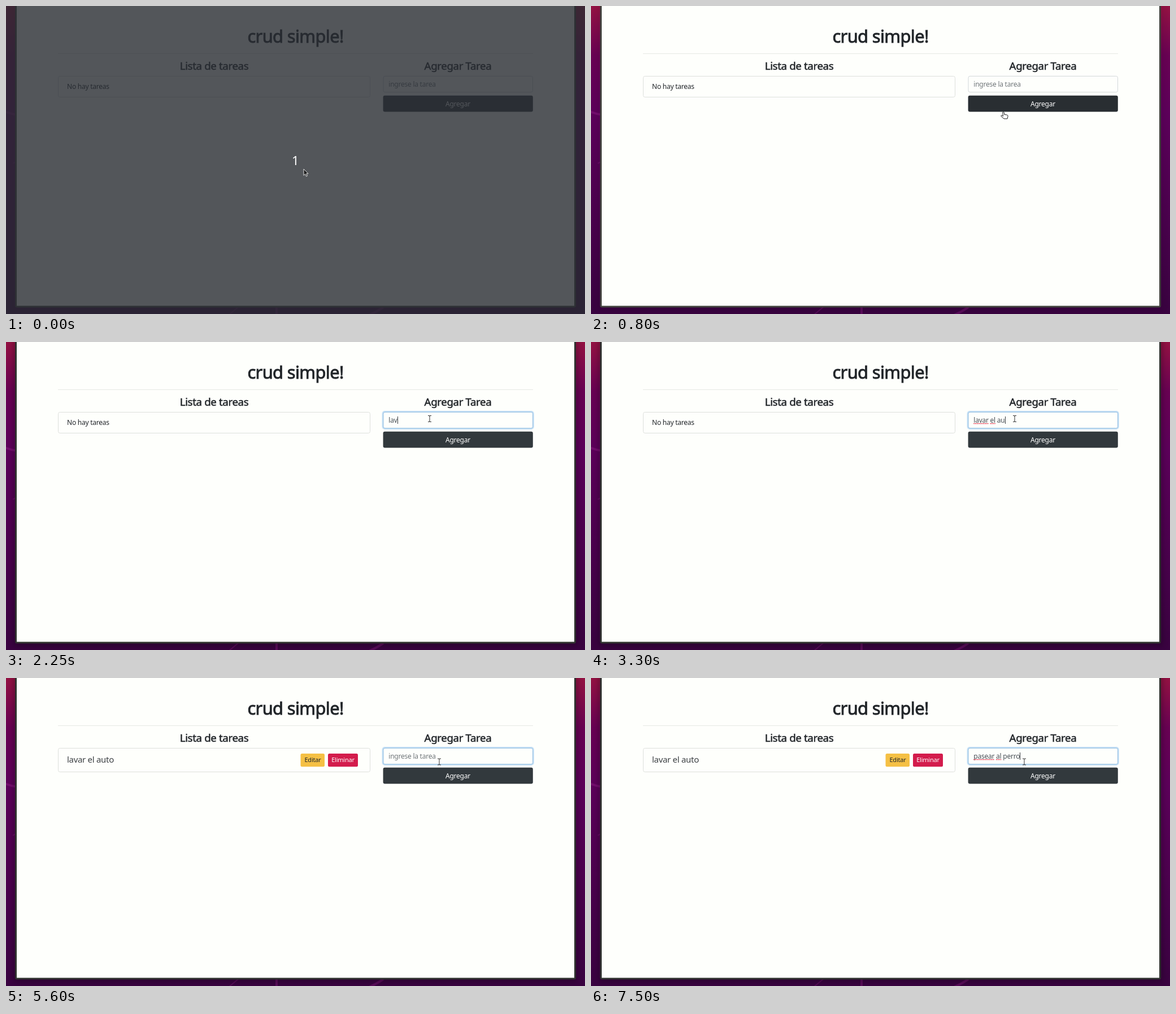
These frames come from a looping animation (1025x546 px, 8 s). An HTML page:

```html
<!DOCTYPE html>
<html lang="es">
<head>
<meta charset="utf-8">
<title>crud simple</title>
<style>
html, body { margin: 0; width: 100%; height: 100%; overflow: hidden; background: #3b0340; }
svg { display: block; width: 1025px; height: 546px; }
text {
  font: 400 12px "Noto Sans", "Open Sans", sans-serif;
  letter-spacing: -0.02em; white-space: pre; fill: #212529;
}
.mid { text-anchor: middle; }
.title { font-size: 30.8px; stroke: #212529; stroke-width: .9px; }
.head { font-size: 18.7px; stroke: #212529; stroke-width: .5px; }
.task { font-size: 15px; font-weight: 300; fill: #3c4043; }
.small { font-size: 11px; }
.light { fill: #fff; }
.box { fill: #fefffc; stroke: #dddfdc; }
</style>
</head>
<body>
<svg viewBox="0 0 1025 546">
  <defs>
    <linearGradient id="sky" x2="0" y2="1">
      <stop offset="0" stop-color="#941243"/>
      <stop offset=".16" stop-color="#680253"/>
      <stop offset=".35" stop-color="#5c005a"/>
      <stop offset="1" stop-color="#390340"/>
    </linearGradient>
    <filter id="blur" x="-5%" y="-5%" width="110%" height="110%"><feGaussianBlur stdDeviation="6"/></filter>
  </defs>

  <rect width="1025" height="546" fill="url(#sky)"/>
  <g fill="none" stroke="#8a1a80" stroke-opacity=".5" stroke-width="4">
    <path d="M-2 187Q8 191 20 193"/>
    <path d="M479 530V548M640 549Q655 543 668 534" stroke-opacity=".4"/>
    <path d="M394 548L412 533M12 279L18 276" stroke-width="2" stroke-opacity=".35"/>
  </g>
  <rect id="shadow" x="14" y="-30" width="997" height="568" filter="url(#blur)"/>
  <path id="frame" d="M16 0H1009V531Q1009 534.500 1005.500 534.500H19.500Q16 534.500 16 531Z"/>
  <rect x="19" width="987" height="531.500" fill="#fefffc"/>

  <text class="title mid" x="512.500" y="64.500">crud simple!</text>
  <path d="M92 84.500H933" stroke="#e6e8e4"/>
  <text class="head mid" x="368.500" y="113">Lista de tareas</text>
  <text class="head mid" x="800" y="113">Agregar Tarea</text>

  <g id="empty">
    <rect class="box" x="92.500" y="124.500" width="552" height="37" rx="3"/>
    <text x="108" y="147">No hay tareas</text>
  </g>
  <g id="item">
    <rect class="box" x="92.500" y="124.500" width="552" height="42" rx="3"/>
    <text class="task" x="108" y="150">lavar el auto</text>
    <rect x="521.500" y="134" width="42.500" height="23.300" rx="2.500" fill="#f5c044"/>
    <text class="small mid" x="543" y="149.300">Editar</text>
    <rect x="570" y="134" width="53" height="23.300" rx="2.500" fill="#d31c4c"/>
    <text class="small mid light" x="596.500" y="149.300">Eliminar</text>
  </g>

  <rect id="ring" x="665.600" y="122" width="269.200" height="33" rx="5" fill="#c4dff5"/>
  <rect id="field" x="668" y="124.400" width="264.500" height="28.400" rx="3" fill="#fefffc" stroke-width=".9"/>
  <text id="typed" x="677.300" y="143"></text>
  <path id="marks" fill="none" stroke="#e0203a" stroke-width="1.300" stroke-dasharray="2 .8"/>
  <path id="caret" stroke="#33383c"/>
  <rect id="button" x="667.600" y="158.700" width="265.200" height="28.800" rx="3"/>
  <text class="mid light" x="800" y="178">Agregar</text>

  <g id="count">
    <rect width="1025" height="546" fill="#282c33" fill-opacity=".8"/>
    <text class="mid light" x="512" y="281.500" style="font-size:22px">1</text>
  </g>

  <g id="pointer">
    <path id="arrow" d="M0 0V11.300L2.600 8.900L4.500 13L6.400 12.100L4.600 8.200H8Z" fill="#1c1c1c" stroke="#f4f4f4" stroke-width=".9"/>
    <path id="hand" d="M-1.500 1Q0 -.5 1 1.200L1.500 5L6 5.600Q8 6 7.800 8L6.800 12.500H.8L-4.300 8Q-4.800 6.200-2.800 6.500L-.8 8Z" fill="#fff" stroke="#222"/>
    <path id="beam" d="M-3 -5.500H-1Q0-5.500 0-4.500Q0-5.500 1-5.500H3M0-5V5M-3 5.500H-1Q0 5.500 0 4.500Q0 5.500 1 5.500H3" fill="none" stroke="#333"/>
  </g>
</svg>
<script>
const LOOP = 8000, STEP = 50, SAVED = 3800;
const el = {};
document.querySelectorAll('svg [id]').forEach(n => el[n.id] = n);

// Each glide slows down towards its end; px and py set how sharply per axis
const home = { x: 527, y: 289 };
const glides = [
  { from: 550, to: 1100, x: 750, y: 136, px: 4, py: 1.8 },
  { from: 4400, to: 4750, x: 772, y: 171, px: 2, py: 2 },
  { from: 4950, to: 5250, x: 767, y: 148.5, px: 2, py: 2 }
];

// Letters arrive evenly between first and last
const phrases = [
  { text: 'lavar el auto', first: 1950, last: 3500, end: SAVED },
  { text: 'pasear al perro', first: 5650, last: 7500, end: LOOP }
];

const ramp = (t, start, span) => Math.max(0, Math.min(1, (t - start) / span));
const pulse = (t, on, off) => ramp(t, on, 100) - ramp(t, off, 100);
const mix = (a, b, k) => `rgb(${a.map((v, i) => Math.round(v + (b[i] - v) * k))})`;
const show = (node, on) => node.setAttribute('display', on ? 'inline' : 'none');

function pointerAt(t) {
  let { x, y } = home;
  for (const g of glides) {
    const rest = 1 - ramp(t, g.from, g.to - g.from);
    x = g.x + (x - g.x) * rest ** g.px;
    y = g.y + (y - g.y) * rest ** g.py;
  }
  return { x, y };
}

function textAt(t) {
  const p = phrases.find(p => t >= p.first && t < p.end);
  if (!p) return '';
  const k = ramp(t, p.first, p.last - p.first);
  return p.text.slice(0, 1 + Math.floor(k * (p.text.length - 1)));
}

function drawInput(t) {
  const text = textAt(t), left = 677.3;
  const at = n => left + (n ? el.typed.getSubStringLength(0, n) : 0);
  el.typed.textContent = text || 'ingrese la tarea';
  el.typed.style.fill = text ? '#495057' : '#70767a';
  show(el.caret, text);
  show(el.marks, text);
  if (!text) return;
  const x = Math.round(at(text.length)) + .5;
  el.caret.setAttribute('d', `M${x} 132V145`);
  // Spelling marks appear under each finished word
  const lines = [...text.matchAll(/\S+(?= )/g)]
    .map(m => `M${at(m.index)} 144.600H${at(m.index + m[0].length)}`);
  el.marks.setAttribute('d', lines.join('') || 'M0 0');
}

function drawPointer(t) {
  const { x, y } = pointerAt(t);
  const inside = x > 668 && x < 933;
  const kind = inside && y > 158 && y < 188 ? 'hand' : inside && y > 124 && y < 153 ? 'beam' : 'arrow';
  for (const name of ['arrow', 'hand', 'beam']) show(el[name], name === kind);
  el.pointer.setAttribute('transform', `translate(${x} ${y})`);
}

function draw(t) {
  const focus = ramp(t, 1250, 200);
  const hover = pulse(t, 700, 900) + pulse(t, 4530, 5050);
  show(el.count, t < 50);
  show(el.empty, t < SAVED);
  show(el.item, t >= SAVED);
  el.shadow.setAttribute('opacity', .12 + .18 * focus);
  el.frame.setAttribute('fill', mix([66, 66, 62], [48, 50, 48], focus));
  el.ring.setAttribute('opacity', focus);
  el.field.setAttribute('stroke', mix([206, 211, 214], [139, 184, 222], focus));
  el.button.setAttribute('fill', mix([50, 57, 61], [41, 46, 50], hover));
  drawInput(t);
  drawPointer(t);
}

const start = performance.now();
function tick() {
  const t = (performance.now() - start) % LOOP;
  draw(Math.floor(t / STEP) * STEP);
  requestAnimationFrame(tick);
}
tick();
</script>
</body>
</html>
```
